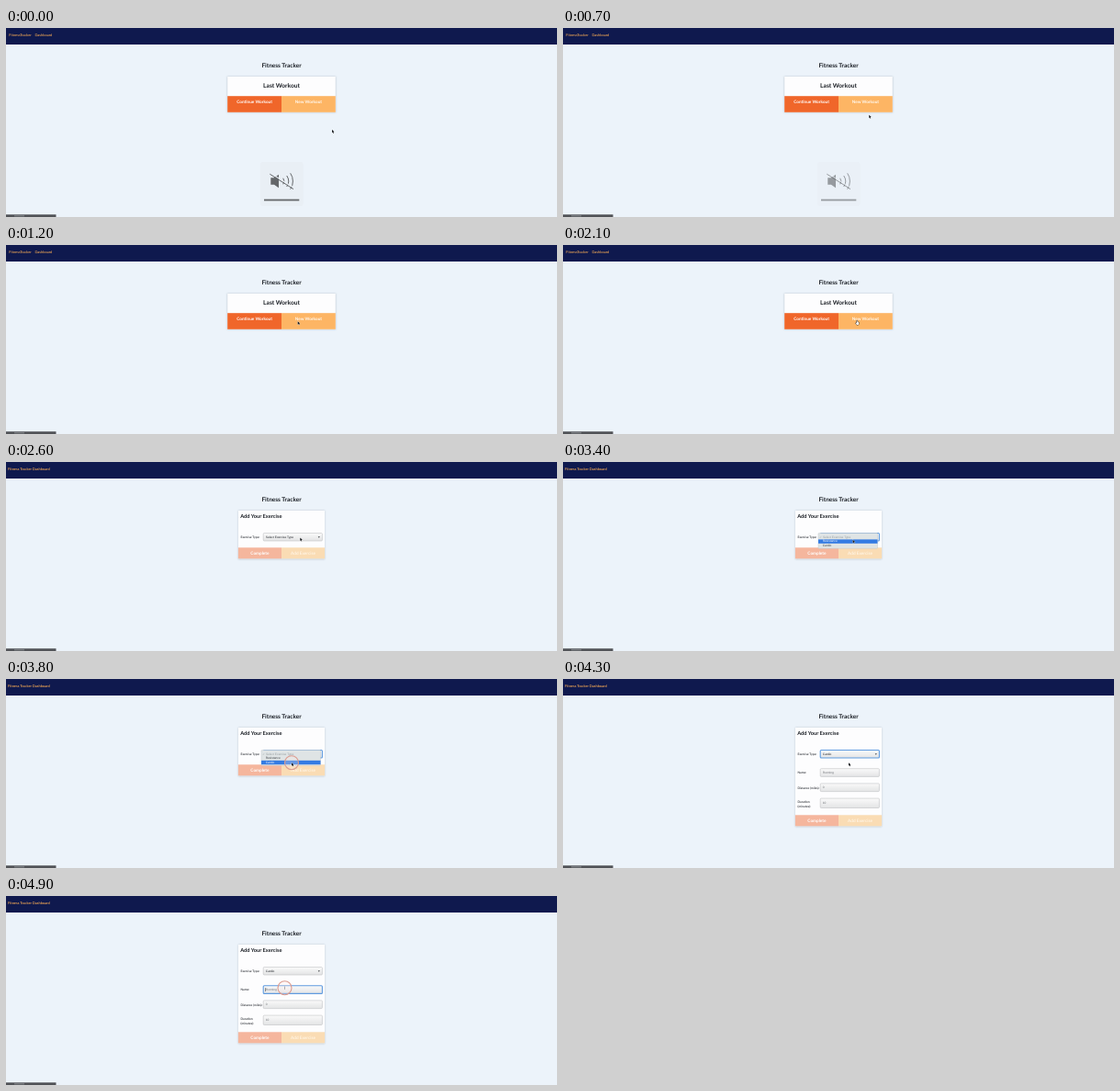
Animation of 600 by 206 pixels, one loop 5 s. Source, as an HTML page with a canvas:

```html
<!DOCTYPE html>
<html lang="en">
<head>
<meta charset="utf-8">
<title>Fitness Tracker</title>
<style>
  html, body { margin: 0; width: 100%; height: 100%; overflow: hidden; background: #ecf3fa; }
  canvas { display: block; width: 600px; height: 206px; }
</style>
</head>
<body>
<canvas id="stage"></canvas>
<script>
const WIDTH = 600, HEIGHT = 206, CENTER = WIDTH / 2;
const canvas = document.getElementById('stage');
const ctx = canvas.getContext('2d');
const ratio = window.devicePixelRatio || 1;
canvas.width = WIDTH * ratio;
canvas.height = HEIGHT * ratio;

const LOOP = 5000, STEP = 100;
const HOVER = 1900, PAGE_CHANGE = 2600, MENU_OPEN = 3300, MENU_CLOSE = 4000, NAME_FOCUS = 4700;
const LATO = 'Lato, sans-serif', ARIAL = '"Liberation Sans", Arial, sans-serif';
const PAGE = '#ecf3fa', INK = '#1b1f25', GOLD = '#f5aa55', GREY = '#64676a', BLUE = '#5f9be0';

const REST = { x: 355, y: 110.8 };
const MOVES = [
  { from: 200, to: 1100, x: 317.7, y: 83.2 },
  { from: 1800, to: 2000, x: 320.3, y: 82.4 },
  { from: PAGE_CHANGE, to: 2900, x: 317.2, y: 82.4 },
  { from: MENU_OPEN, to: 3600, x: 311, y: 91.2 },
  { from: 4300, to: NAME_FOCUS, x: 303.5, y: 100.2 }
];
const CLICK_LENGTH = 200;
const CLICKS = [PAGE_CHANGE, MENU_OPEN, MENU_CLOSE, LOOP].map(end => end - CLICK_LENGTH);

const clamp = v => Math.max(0, Math.min(1, v));
const ease = v => v * v * (3 - 2 * v);
const progress = (t, from, to) => clamp((t - from) / (to - from));

function pointerAt(t) {
  return MOVES.reduce((p, move) => {
    const k = ease(progress(t, move.from, move.to));
    return { x: p.x + (move.x - p.x) * k, y: p.y + (move.y - p.y) * k };
  }, REST);
}

function rect(x, y, w, h, fill) {
  ctx.fillStyle = fill;
  ctx.fillRect(x, y, w, h);
}

function box(x, y, w, h, radius, fill, stroke, width = 0.5) {
  ctx.beginPath();
  ctx.roundRect(x, y, w, h, radius);
  ctx.fillStyle = fill;
  ctx.fill();
  if (stroke) outline(stroke, width);
}

function outline(color, width) {
  ctx.strokeStyle = color;
  ctx.lineWidth = width;
  ctx.stroke();
}

function line(x0, y0, x1, y1, color, width) {
  ctx.beginPath();
  ctx.moveTo(x0, y0);
  ctx.lineTo(x1, y1);
  outline(color, width);
}

function shape(path, fill, stroke, width) {
  const p = new Path2D(path);
  if (stroke) {
    ctx.strokeStyle = stroke;
    ctx.lineWidth = width;
    ctx.stroke(p);
  }
  ctx.fillStyle = fill;
  ctx.fill(p);
}

function text(str, x, y, size, color, { weight = 400, family = LATO, align = 'left' } = {}) {
  ctx.font = `${weight} ${size}px ${family}`;
  ctx.textAlign = align;
  ctx.fillStyle = color;
  ctx.fillText(str, x, y);
}

const heading = (str, x, y, size, align = 'center') =>
  text(str, x, y, size, INK, { weight: 700, align });
const fieldText = (str, x, y, color) => text(str, x, y, 3.25, color, { family: ARIAL });

function card(width, bottom) {
  ctx.save();
  ctx.shadowColor = 'rgba(60,75,95,.3)';
  ctx.shadowBlur = 2 * ratio;
  ctx.shadowOffsetY = 0.3 * ratio;
  rect(CENTER - width / 2, 53, width, bottom - 53, '#fdfdfe');
  ctx.restore();
}

// Two equal buttons along the bottom of a card
function buttons(width, bottom, height, size, baseline, items) {
  const half = width / 2, top = bottom - height;
  items.forEach(({ label, fill, color }, i) => {
    const left = CENTER + (i - 1) * half;
    rect(left, top, half, height, fill);
    text(label, left + half / 2, top + baseline, size, color, { weight: 700, align: 'center' });
  });
}

function frame() {
  rect(0, 0, WIDTH, HEIGHT, PAGE);
  rect(0, 0, WIDTH, 18, '#0f194e');
  rect(0, 203.3, 54.5, 2.7, '#505256');
  rect(9, 204, 11, 1.5, '#777a7e');
  heading('Fitness Tracker', CENTER, 43.3, 6.5);
}

function homePage() {
  text('FitnessTracker', 3.3, 8.9, 3.95, GOLD, { weight: 500 });
  text('Dashboard', 31.4, 8.9, 3.95, GOLD, { weight: 500 });
  card(117.6, 91.8);
  heading('Last Workout', CENTER, 65.3, 6.6);
  buttons(117.6, 91.8, 17.6, 4.7, 7.8, [
    { label: 'Continue Workout', fill: '#f0662a', color: '#fff' },
    { label: 'New Workout', fill: '#fdb564', color: '#fffaf2' }
  ]);
}

function field(y, h, value, color, focused) {
  const fill = ctx.createLinearGradient(0, y, 0, y + h);
  fill.addColorStop(0, '#fafafa');
  fill.addColorStop(1, '#e3e4e5');
  box(280.2, y, 64.2, h, 1, fill, focused ? BLUE : '#b4b6b9', focused ? 1.1 : 0.5);
  fieldText(value, 282.8, y + h / 2 + 1.1, color);
}

function menu(pointer) {
  const rowHeight = 4.4, top = 80;
  const active = Math.floor((pointer.y - top) / rowHeight);
  box(278, 77.5, 64.5, 16.8, 0.8, '#dfe4e5', '#b9c0c4', 0.4);
  if (active > 0) rect(278, top + active * rowHeight, 64.5, rowHeight, '#347be3');
  ['✓ Select Exercise Type', 'Resistance', 'Cardio'].forEach((row, i) => {
    const color = i === 0 ? '#969c9f' : i === active ? '#fff' : '#3a3e42';
    fieldText(row, i === 0 ? 279.3 : 282.7, top + 3 + i * rowHeight, color);
  });
}

function exercisePage(t, pointer) {
  const expanded = t >= MENU_CLOSE, naming = t >= NAME_FOCUS;
  const bottom = expanded ? 160.3 : 105.3;
  text('Fitness Tracker Dashboard', 2, 8.9, 3.95, GOLD, { weight: 600 });
  card(94.2, bottom);
  heading('Add Your Exercise', 255.2, 61, 5.7, 'left');

  const label = (str, y) => text(str, 255.5, y, 3.35, INK, { weight: 500 });
  label('Exercise Type:', 82.9);
  field(77.5, 8.5, expanded ? 'Cardio' : 'Select Exercise Type', INK, t >= MENU_OPEN && !naming);
  shape('M339.7 81.2h2.2l-1.1 1.5z', '#3a3d40');

  if (expanded) {
    label('Name:', 103.4);
    label('Distance (miles):', 119.5);
    label('Duration', 135.3);
    label('(minutes):', 139.5);
    ['Running', '0', '10'].forEach((value, i) =>
      field(97.7 + i * 16.2, i === 2 ? 10.4 : 8.7, value, '#6d7177', naming && i === 0));
    if (naming) rect(282.3, 100.2, 0.5, 3.8, INK);
  }

  buttons(94.2, bottom, 12, 4.7, 7.8, [
    { label: 'Complete', fill: '#f5b69d', color: '#fff' },
    { label: 'Add Exercise', fill: '#fadcb4', color: '#fff4e3' }
  ]);
  if (t >= MENU_OPEN && !expanded) menu(pointer);
}

function muteOverlay(t) {
  const panel = '#e9eff5';
  ctx.save();
  ctx.globalAlpha = 1 - progress(t, 400, 1200);
  box(276.8, 146, 47, 48, 3, panel);
  shape('M288.3 163.3h3.7l5-3.5v14.4l-5-3.5h-3.7z', GREY);
  for (let i = 1; i <= 3; i++) {
    ctx.beginPath();
    ctx.arc(297, 167, 1 + i * 4.8, -0.6, 0.6);
    outline(GREY, 1);
  }
  line(288, 158.2, 314, 174.6, panel, 1.2);
  line(287.3, 159.2, 313, 175.6, GREY, 1);
  rect(281, 186.6, 38.3, 1.8, GREY);
  ctx.restore();
}

function pointerShape(t, { x, y }) {
  if (CLICKS.some(start => t >= start && t < start + CLICK_LENGTH)) {
    ctx.beginPath();
    ctx.arc(x, y, 7.5, 0, Math.PI * 2);
    ctx.fillStyle = 'rgba(255,235,230,.25)';
    ctx.fill();
    outline('#dc9c90', 1.1);
  }
  ctx.save();
  ctx.translate(x, y);
  if (t >= NAME_FOCUS) {
    line(0, -1.7, 0, 1.7, GREY, 0.5);
  } else if (t >= HOVER && t < PAGE_CHANGE) {
    shape('M-.4 0h.7v1.5l1.7.5-.6 2.6h-1.9l-1.1-2 1.2.2z', '#fff', '#33373c', 0.9);
  } else {
    shape('M0 0v3.5l.8-.7.6 1.3.6-.3-.6-1.3 1.1-.1z', '#16191d', '#fff', 0.5);
  }
  ctx.restore();
}

function draw(t) {
  const pointer = pointerAt(t);
  ctx.setTransform(ratio, 0, 0, ratio, 0, 0);
  ctx.textRendering = 'geometricPrecision';
  frame();
  if (t < PAGE_CHANGE) homePage();
  else exercisePage(t, pointer);
  muteOverlay(t);
  pointerShape(t, pointer);
}

// The picture advances ten times a second
function tick() {
  draw(Math.floor((performance.now() % LOOP) / STEP) * STEP);
  requestAnimationFrame(tick);
}
tick();
</script>
</body>
</html>
```
